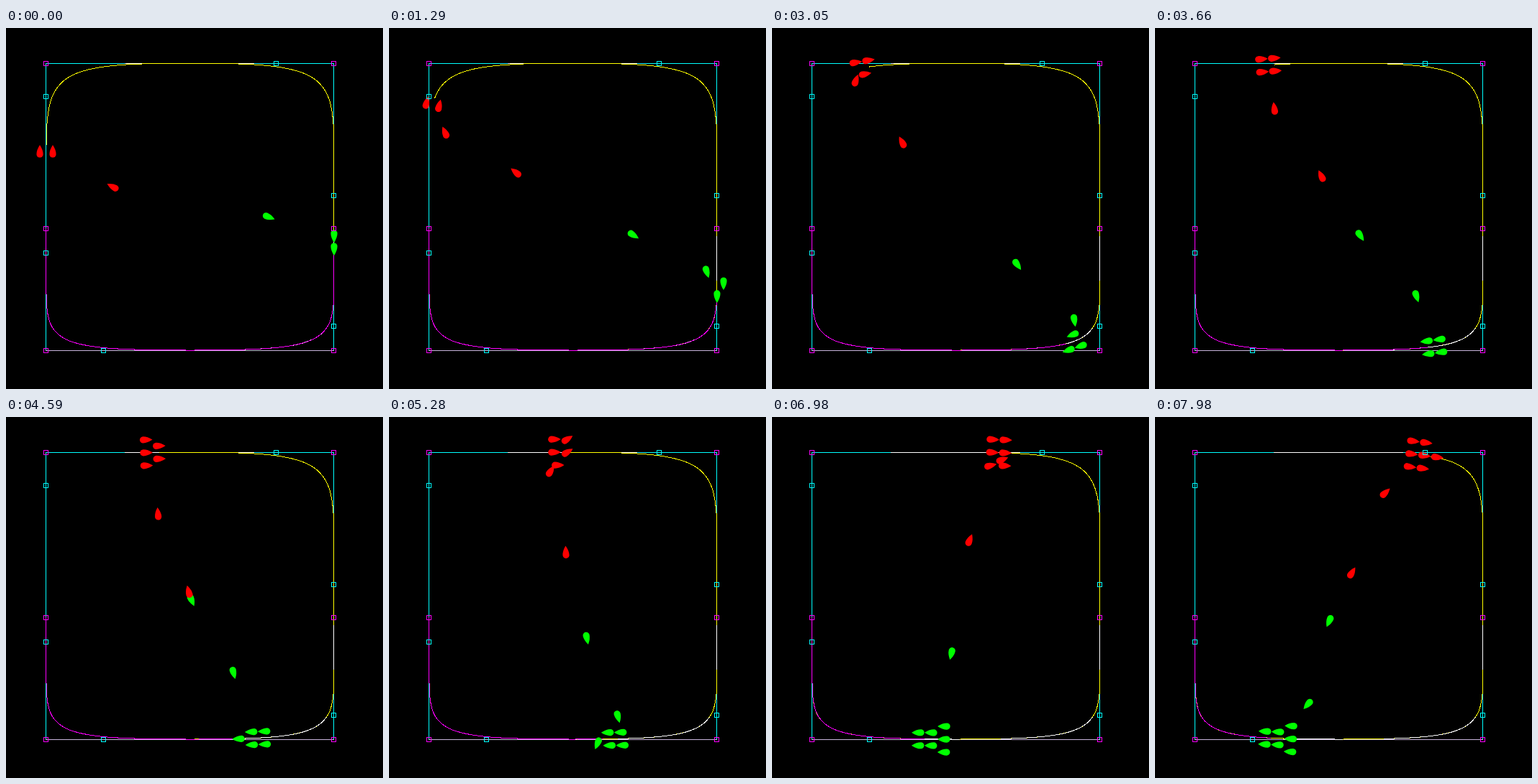
An HTML page that plays this animation: 524x503 px, repeating every 8 s.

```html
<!DOCTYPE html>
<html lang="en">
<head>
<meta charset="utf-8">
<title>Two squads on a track</title>
<style>
  html, body { margin: 0; width: 100%; height: 100%; overflow: hidden; background: #000; }
  svg { display: block; width: 524px; height: 503px; }
  .lines { fill: none; stroke-width: 1; shape-rendering: crispEdges; }
  .cyan { stroke: #0ff; }
  .magenta { stroke: #f0f; }
  .yellow { stroke: #ff0; }
  .white { stroke: #fff; }
  .lilac { stroke: #c8b4dc; }
</style>
</head>
<body>
<svg viewBox="0 0 524 503">
  <g class="lines">
    <path class="cyan" d="M55.5 449V49.5H455.5V449"/>
    <path class="lilac" d="M55 449.5H456"/>
    <path class="magenta" d="M55.5 279V371"/>
    <path class="white" d="M165 49.5H345"/>
    <path class="yellow" id="greenBehind"/>
    <path class="white" id="greenBands" stroke-dasharray="0 126 62 68 135 57 66 999"/>
    <path class="yellow" id="redAhead" d="M56.02 279V164C56.02 60.5 76 49.02 256 49.02S455.98 60.5 455.98 164V279"/>
    <path class="magenta" id="greenAhead" d="M455.98 164V364C455.98 440.5 436 449.02 256 449.02S56.02 440.5 56.02 371"/>
  </g>
  <g id="drops"></g>
  <g id="markers" class="lines"></g>
</svg>
<script>
const SVG_NS = 'http://www.w3.org/2000/svg';
const LOOP = 8000, STEP = 76.8, PHASE = 26.5, LAST = 104, WARMUP = 18;
const MARCH = 3.88, FLIGHT = 6.2, JOIN_RADIUS = 42, SPACING = 9, FULL = 7;
const HUB = { x: 255.5, y: 249.5 };

const byId = id => document.getElementById(id);
const clamp = (v, lo, hi) => Math.min(hi, Math.max(lo, v));
const distance = (p, q) => Math.hypot(q.x - p.x, q.y - p.y);

function add(parent, tag, attrs) {
  const el = document.createElementNS(SVG_NS, tag);
  for (const name in attrs) el.setAttribute(name, attrs[name]);
  return parent.appendChild(el);
}

// Moves p towards q by at most FLIGHT; on arrival it takes q's heading.
function approach(p, q) {
  const d = distance(p, q);
  if (d <= FLIGHT) return Object.assign(p, q);
  p.angle = Math.atan2(q.y - p.y, q.x - p.x);
  p.x += FLIGHT * Math.cos(p.angle);
  p.y += FLIGHT * Math.sin(p.angle);
}

// Rank sizes from back to front: full ranks with the rest in front, or evenly shared.
function fullRanks(n) {
  const width = Math.ceil(Math.sqrt(n));
  return Array.from({ length: Math.ceil(n / width) }, (_, r) => Math.min(width, n - r * width));
}
function evenRanks(n) {
  const count = Math.ceil(Math.sqrt(n));
  return Array.from({ length: count }, (_, r) => Math.floor((n + count - 1 - r) / count));
}

function slotsOf(ranks) {
  return ranks.flatMap((size, r) => Array.from({ length: size }, (_, j) => ({
    forward: (2 * r - ranks.length + 1) * SPACING,
    right: (2 * j - size + 1) * SPACING
  })));
}

function pose(track, s) {
  const a = track.getPointAtLength(s - 1), b = track.getPointAtLength(s + 1);
  const { x, y } = track.getPointAtLength(s);
  return { x, y, angle: Math.atan2(b.y - a.y, b.x - a.x) };
}

function place(centre, { forward, right }) {
  const c = Math.cos(centre.angle), s = Math.sin(centre.angle);
  return {
    x: centre.x + forward * c - right * s,
    y: centre.y + forward * s + right * c,
    angle: centre.angle
  };
}

// The newcomer picks its nearest slot, then the others do in order of joining.
function assignSlots(members, slots, centre) {
  const free = [...slots];
  const newcomer = members[members.length - 1];
  for (const m of [newcomer, ...members.slice(0, -1)]) {
    const gaps = free.map(slot => Math.round(distance(m.at, place(centre, slot))));
    [m.slot] = free.splice(gaps.indexOf(Math.min(...gaps)), 1);
  }
}

const births = new Set(Array.from({ length: 7 }, (_, i) => Math.round(-17.6 + 19.2 * i)));

// Runs one squad and returns the drops' poses for every step.
function simulate(track, start, ranksFor) {
  const origin = pose(track, start - MARCH * WARMUP);
  const members = slotsOf(ranksFor(2)).map(slot => ({ slot, at: place(origin, slot) }));
  const flyers = [];
  const history = [];
  for (let k = -WARMUP; k <= LAST; k++) {
    const centre = pose(track, start + MARCH * k);
    if (births.has(k - 1)) flyers.push({ ...HUB });
    for (const f of flyers) approach(f, centre);
    if (flyers.length && members.length < FULL && distance(flyers[0], centre) < JOIN_RADIUS) {
      members.push({ at: flyers.shift() });
      assignSlots(members, slotsOf(ranksFor(members.length)), centre);
    }
    for (const m of members) approach(m.at, place(centre, m.slot));
    if (k >= 0) history.push([...members.map(m => m.at), ...flyers].map(p => ({ ...p })));
  }
  return history;
}

function makeSquad(track, start, ranksFor, fill) {
  const drops = Array.from({ length: FULL + 2 }, () => add(byId('drops'), 'path', {
    d: 'M9 0Q2-4.6-4-4.6A4.6 4.6 0 0 0-4 4.6Q2 4.6 9 0Z', fill
  }));
  return { track, start, drops, history: simulate(track, start, ranksFor) };
}

const marker = colour => ([x, y]) =>
  add(byId('markers'), 'rect', { class: colour, x: x - 2.5, y: y - 2.5, width: 6, height: 6 });
const anchors = [[55, 279], [55, 49], [455, 49], [455, 279], [455, 449], [55, 449]];
anchors.forEach(marker('magenta'));
anchors.map(([x, y], i) => {
  const [nx, ny] = anchors[(i + 1) % anchors.length];
  return [x + 0.8 * (nx - x), y + 0.8 * (ny - y)];
}).forEach(marker('cyan'));

const greenTrack = byId('greenAhead');
for (const id of ['greenBehind', 'greenBands']) byId(id).setAttribute('d', greenTrack.getAttribute('d'));
const green = makeSquad(greenTrack, 135, evenRanks, '#0f0');
const red = makeSquad(byId('redAhead'), 107, fullRanks, '#f00');

function drawSquad({ track, start, drops, history }, k) {
  track.setAttribute('stroke-dasharray', `0 ${start + MARCH * k + SPACING} 999 0`);
  drops.forEach((drop, i) => {
    const p = history[k][i];
    drop.style.display = p ? '' : 'none';
    if (p) drop.setAttribute('transform',
      `translate(${p.x} ${p.y}) rotate(${p.angle * 180 / Math.PI})`);
  });
}

const began = performance.now();
let shown = -1;
function tick() {
  const time = (performance.now() - began) % LOOP;
  const k = clamp(Math.floor((time + PHASE) / STEP), 0, LAST);
  if (k !== shown) {
    shown = k;
    drawSquad(green, k);
    drawSquad(red, k);
  }
  requestAnimationFrame(tick);
}
tick();
</script>
</body>
</html>
```
